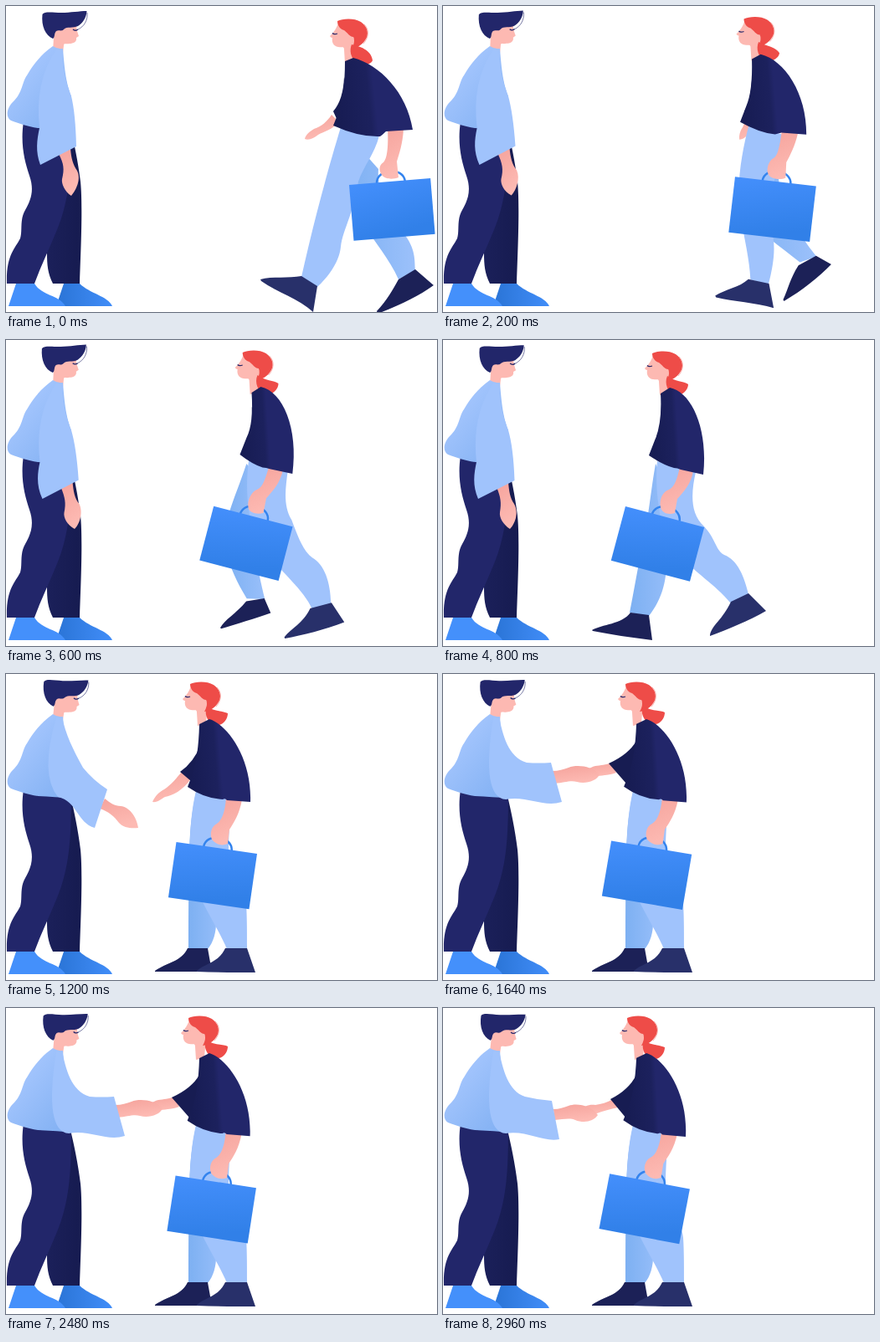
Write an HTML page that moves like this. It is 515 px wide and 366 px high and loops after 3.88 s.

```html
<!DOCTYPE html>
<html lang="en">
<head>
<meta charset="utf-8">
<title>Handshake</title>
<style>
  html, body { margin: 0; width: 100%; height: 100%; overflow: hidden; background: #fff; }
  svg { display: block; width: 515px; height: 366px; }
</style>
</head>
<body>
<svg viewBox="0 0 515 366">
  <defs>
    <linearGradient id="navy" y1=".1" y2="0"><stop offset="0" stop-color="#171c53"/><stop offset=".4" stop-color="#1c215d"/><stop offset=".48" stop-color="#22266a"/></linearGradient>
    <linearGradient id="navyFar"><stop offset="0" stop-color="#1b205a"/><stop offset="1" stop-color="#161b50"/></linearGradient>
    <linearGradient id="pale" x1=".2" y1=".45" x2=".7" y2="1"><stop offset="0" stop-color="#a0c3fc"/><stop offset="1" stop-color="#86b3f4"/></linearGradient>
    <linearGradient id="paleFar"><stop offset="0" stop-color="#7db0f2"/><stop offset="1" stop-color="#9cc1fb"/></linearGradient>
    <linearGradient id="bag" x2=".3" y2="1"><stop offset="0" stop-color="#448ffc"/><stop offset="1" stop-color="#3180e8"/></linearGradient>
    <linearGradient id="shoeFar"><stop offset="0" stop-color="#2a74d6"/><stop offset="1" stop-color="#418df8"/></linearGradient>
    <linearGradient id="skin" x2=".3" y2="1"><stop offset="0" stop-color="#f5a39c"/><stop offset="1" stop-color="#fdbab3"/></linearGradient>
  </defs>

  <g id="woman">
    <path id="reach" fill="url(#skin)"/>
    <path id="farSleeve" fill="#171c52"/>
    <path id="farLeg" fill="url(#paleFar)"/>
    <path id="farShoe" fill="#1c2157"/>
    <path id="nearLeg" fill="#a0c3fc"/>
    <path id="nearShoe" fill="#28306a"/>
    <g id="head">
      <path fill="#fdb9b2" d="M397 20C395 27 392 31 387 36Q388 38 390 38C389 43 391 48 397 49C401 50 404 48 404 52L405 68L415 65L417 42L410 25Z"/>
      <path fill="#ee4c48" d="M396 18C402 15 416 14 424 19C433 25 434 35 429 41C426 46 420 50 413 51C416 46 417 41 415 37C411 37 408 32 404 29C400 28 396 24 396 18Z"/>
      <path fill="none" stroke="#22266a" stroke-width="1.3" d="M390 32.500Q392 34.500 396 33"/>
      <path fill="none" stroke="#f58a84" stroke-width=".7" d="M428 22C434 28 434 37 427 45"/>
    </g>
    <path id="pony" fill="#ee4c48"/>
    <g id="swing">
      <g id="handle"><path fill="none" stroke="#3484ee" stroke-width="2.500" d="M33 1C34 -17 66 -17 67 1"/></g>
      <path id="carry" fill="url(#skin)"/>
      <g id="case"><path fill="url(#bag)" d="M0 0H97.500V67H0Z"/></g>
    </g>
    <g id="lean"><path id="torso" fill="url(#navy)"/></g>
  </g>

  <g id="man">
    <path fill="url(#navyFar)" d="M58 145L78 150C81 163 86 185 89 210C92 240 89 300 88 332L56 332C50 320 49 310 49 295Z"/>
    <path fill="url(#shoeFar)" d="M69 332L88 332C100 344 122 347 127 359L60 359Z"/>
    <path fill="#22266a" d="M21 138C17 165 22 185 28 203C34 220 30 232 23 244C16 256 20 268 17 278C11 290 0 298 1 332L34 332C42 310 52 290 60 270C75 235 78 200 78 148Z"/>
    <path fill="#4490fb" d="M12 332L34 332C43 347 63 345 71 359L3 359Z"/>
    <g id="manHead">
      <path fill="#fdb9b2" d="M58 26L84 22C84 28 86 33 87 36L84 38C85 43 80 45 76 45C72 46 69 44 69 47L68 56L56 54L57 38Z"/>
      <path fill="#22266a" d="M43.500 10C46 6 56 8 66 8C77 8 88 6 96.500 6C96 14 92 20 86 24C80 27 73 24 69 28C66 31 63 28 60 30C57 33 59 37 56 39C47 35 42 24 43.500 10Z"/>
      <path fill="none" stroke="#22266a" stroke-width="1.300" d="M80 28Q83 30.500 86 28"/>
      <path fill="none" stroke="#22266a" stroke-width=".6" d="M97 8C98 17 93 25 86 28"/>
    </g>
    <path fill="url(#pale)" d="M56 48Q62 52 68 51C70 78 72 92 78 108L79 149C66 147 52 147 38 146C25 144 17 141 6 137C-1 133 1 122 8 115C20 104 19 91 25 83C34 68 42 58 56 48Z"/>
    <path id="manHand" fill="url(#skin)"/>
    <path id="sleeve" fill="#a0c3fc"/>
  </g>
</svg>
<script>
const LOOP = 3880, STOP = 2960, STEP = 40, BEAT = 560;
const walk = [0, 400, 800, 1120];
const lift = [0, 400, 800, 1200, 1440];
const greet = [0, 400, 800, 960, 1200, 1440];
const NUM = /-?\d+(?:\.\d+)?/g;
const $ = id => document.getElementById(id);
const numbers = s => s.match(NUM).map(Number);

const parts = [];
function part(id, attr, times, poses, shaken) {
  parts.push({ el: $(id), attr, times, form: poses[0], poses: poses.map(numbers), shaken: shaken && numbers(shaken) });
}

part('farLeg', 'd', walk, [
  'M405 150C408 190 415 230 430 265C440 282 458 302 469 327L489 316C488 305 490 290 475 272C455 255 443 220 445 195C446 180 446 165 446 155Z',
  'M328 148C318 170 305 185 298 202C285 235 325 262 378 294L398 290C375 268 355 245 350 225C352 200 355 180 355 155Z',
  'M254 148C250 170 248 190 244 215C236 255 230 290 223 326L246 330C258 315 264 298 266 282C272 255 278 230 283 210C286 190 290 175 290 158Z',
  'M227 142C222 165 219 190 219 222C218 260 218 295 218 329L241 329C249 320 252 305 251 290C254 265 258 240 260 215C262 190 264 170 264 152Z']);
part('nearLeg', 'd', walk, [
  'M400 145C394 165 386 192 380 215C369 255 362 285 353 324L372 336C383 326 398 308 400 288C402 268 415 250 421 210C428 190 440 178 446 155Z',
  'M330 142C325 165 321 195 326 225C335 260 368 295 376 329L399 329C401 300 396 280 387 267C380 255 370 235 370 208C372 190 376 175 376 155Z',
  'M256 145C254 165 255 190 262 222C275 265 320 285 343 314L365 304C360 283 352 263 336 257C326 252 326 238 312 223C294 207 297 180 302 158Z',
  'M227 140C221 165 219 195 220 222C222 262 250 295 264 329L288 329C288 310 288 290 287 275C285 255 270 235 266 210C266 190 268 175 268 150Z']);
part('farShoe', 'd', walk, [
  'M443 365C455 352 462 340 469 327L489 315L511 334C495 346 470 358 444 368Z',
  'M362 343C363 330 362 318 375 300L397 289L411 294C398 310 380 330 363 344Z',
  'M178 347C190 340 214 340 224 326L246 329L250 359C225 356 200 352 179 348Z',
  'M178 355C192 345 210 344 217 328L241 328L246 356C220 356 200 356 178 356Z']);
part('nearShoe', 'd', walk, [
  'M304 327C318 323 338 326 353 323L372 335L367 366C350 350 325 343 305 329Z',
  'M338 358C350 348 364 343 372 329L400 328L412 355C388 357 360 360 339 360Z',
  'M319 353C321 341 334 335 344 313L365 303L386 324C365 336 340 346 319 354Z',
  'M228 355C240 345 254 345 262 328L288 328L298 357C275 357 250 357 228 356Z']);
part('torso', 'd', walk, [
  'M405 66L415 62C446 70 479 103 486 148L454 150Q450 154 447 156Q422 157 391 143L397 128Q405 105 405 66Z',
  'M333 62L344 55C370 61 392 105 386 158L358 153Q354 152 350 152Q335 148 319 136L327 115Q335 100 333 62Z',
  'M260 64L271 57C297 62 317 106 311 161L284 155Q280 153 276 153Q262 149 246 138L253 120Q262 100 260 64Z',
  'M231 60L243 54C264 60 294 100 292 153L264 151Q262 148 259 150Q237 149 217 135L222 122Q230 100 231 60Z']);
part('farSleeve', 'd', lift, [
  'M404 85Q403 112 391 126L397 139L415 130Z',
  'M334 80Q334 112 328 126L333 139L345 130Z',
  'M261 80Q261 112 255 127L263 139L275 130Z',
  'M232 85Q225 105 208 117L221 128L240 120Z',
  'M231 80Q222 96 198 107L219 131L240 120Z'],
  'M231 80Q222 98 200 109L219 132L240 120Z');
part('reach', 'd', lift, [
  'M389 130C384 138 377 144 368 147C363 150 358 154 357 159C362 161 368 158 373 154C380 150 391 148 397 138Z',
  'M336 125C338 135 340 142 343 147C345 150 347 155 350 160C354 158 357 154 358 148C358 140 356 130 352 125Z',
  'M272 125C274 135 277 142 281 147C283 150 285 153 288 157C291 154 293 151 293 147C293 140 292 130 288 125Z',
  'M211 116C204 124 197 133 189 138C183 141 178 146 175 153C181 154 186 149 190 147C198 146 212 139 221 125Z',
  'M201 106C195 109 188 109 182 110C175 112 168 116 163 122C170 126 178 124 185 122C192 121 200 121 207 118Z'],
  'M203 109C196 113 189 115 182 116C174 115 168 118 165 122C171 126 178 128 184 126C191 123 200 121 209 119Z');
part('carry', 'd', walk, [
  'M456 147L475 147C474 165 470 176 467 186L469 205C462 208 452 207 449 202C445 196 446 190 451 187C456 182 457 165 456 147Z',
  'M357 152L376 156C371 170 364 180 358 188L355 206C350 209 338 207 335 202C332 195 337 181 345 178C350 175 353 165 357 152Z',
  'M283 152L299 156C297 172 287 182 280 190L277 207C270 209 262 208 260 200C258 190 263 181 270 179C277 176 280 165 283 152Z',
  'M263 147L282 150C279 168 272 178 267 186L265 203C258 206 251 204 246 198C243 190 246 182 252 179C258 175 262 165 263 147Z']);
const bagPoses = [
  'translate(410 214) rotate(-4.7)', 'translate(294 198.5) rotate(13.8)',
  'translate(218 199) rotate(14.9)', 'translate(203.5 201) rotate(8.2)'];
part('case', 'transform', walk, bagPoses);
part('handle', 'transform', walk, bagPoses);
part('head', 'transform', lift, [
  'translate(0 0)', 'translate(-73 -4)', 'translate(-146 -2)', 'translate(-176 -6)', 'translate(-178 -6)'],
  'translate(-176 -6)');
part('pony', 'd', lift, [
  'M413 46C422 48 436 52 438 65C436 71 424 71 418 67C412 62 410 53 413 46Z',
  'M341 41C350 48 361 47 366 51C366 59 357 66 349 64C342 61 337 50 341 41Z',
  'M268 43C277 50 288 49 293 53C293 61 284 68 276 66C269 63 264 52 268 43Z',
  'M240 39C249 45 260 44 265 47C265 56 257 63 249 61C242 59 236 49 240 39Z',
  'M239 38C249 45 260 43 265 46C265 55 257 62 249 60C242 58 235 49 239 38Z'],
  'M240 39C249 45 260 44 265 47C265 56 257 63 249 61C242 59 236 49 240 39Z');

const handDown = 'M63 177L77 171C78 182 80 190 85 197C90 207 84 220 78 227C70 222 66 212 67 207C70 195 69 188 63 177Z';
const handReady = 'M64 176L78 170C79 181 80 189 85 196C91 207 86 220 80 226C72 221 67 212 68 206C70 195 69 188 64 176Z';
part('manHand', 'd', greet, [
  handDown,
  'M67 176L81 169C82 180 84 190 90 196C94 206 90 220 84 226C74 222 70 212 71 207C74 195 72 188 67 176Z',
  handReady, handReady,
  'M112 161L118 149C124 154 130 158 137 158C147 159 156 170 158 184C150 185 140 184 135 178C130 171 122 164 112 161Z',
  'M134 131L131 116C138 116 144 114 150 112C160 108 178 110 187 120C184 128 170 132 160 129C152 127 145 130 134 131Z'],
  'M133 134L132 121C139 121 144 119 150 117C160 113 178 117 185 128C180 136 168 138 158 134C152 131 144 133 133 134Z');
const sleeveReady = 'M67 51C68 78 72 92 78 108Q84 128 85.500 168L42 190C35 174 37 160 40 146Q34 90 60 52Z';
part('sleeve', 'd', greet, [
  'M67 51C68 78 72 92 78 108Q83 128 84 168L41 190C35 174 37 160 40 146Q34 90 60 52Z',
  'M67 51C68 78 72 92 78 108Q84 128 88 167L45 190C37 174 38 160 41 146Q34 90 60 52Z',
  sleeveReady, sleeveReady,
  'M67 51C71 72 80 90 92 112Q104 127 121 138L106 184C85 178 85 152 62 147Q40 120 60 52Z',
  'M67 51C71 72 78 100 100 106Q114 107 129 106L142 153C120 160 100 145 75 150Q45 148 60 52Z'],
  'M67 51C71 72 78 100 98 106Q114 110 130 111L139 157C120 161 100 146 75 150Q45 148 60 52Z');
part('manHead', 'transform', lift, [
  'rotate(0 62 50)', 'rotate(-1.5 62 50)', 'rotate(0.3 62 50)', 'rotate(2.5 62 50)', 'rotate(1.6 62 50)'],
  'rotate(2.8 62 50)');

// Monotone cubic through v at times ts; comes to rest at the last key.
function curve(ts, v, t) {
  const last = ts.length - 1;
  if (t >= ts[last]) return v[last];
  const i = ts.findIndex(x => x > t) - 1;
  const slope = k => (v[k + 1] - v[k]) / (ts[k + 1] - ts[k]);
  const tangent = k => {
    if (k === last) return 0;
    if (k === 0) return slope(0);
    const a = slope(k - 1), b = slope(k);
    return a * b <= 0 ? 0 : 2 * a * b / (a + b);
  };
  const h = ts[i + 1] - ts[i], u = (t - ts[i]) / h, w = 1 - u;
  return w * w * ((1 + 2 * u) * v[i] + u * h * tangent(i))
       + u * u * ((3 - 2 * u) * v[i + 1] - w * h * tangent(i + 1));
}

const wave = (t, start) => 2 * Math.PI * (t - start) / BEAT;
function ramp(t, a, b) {
  const u = Math.min(1, Math.max(0, (t - a) / (b - a)));
  return u * u * (3 - 2 * u);
}

function draw(now) {
  const t = Math.min(STOP, Math.floor((now % LOOP) / STEP) * STEP);
  const shake = Math.sin(wave(t, 1640)) / 0.78 * ramp(t, 1440, 1640);
  for (const { el, attr, times, form, poses, shaken } of parts) {
    let i = 0;
    el.setAttribute(attr, form.replace(NUM, () => {
      const v = poses.map(p => p[i]);
      let x = curve(times, v, t);
      if (shaken) x += (shaken[i] - v[v.length - 1]) * shake;
      i++;
      return x.toFixed(2);
    }));
  }
  const turn = -2.5 * (Math.cos(wave(t, 1484)) - 0.4) * ramp(t, 1200, 1484);
  $('swing').setAttribute('transform', `rotate(${turn} 262 105)`);
  $('lean').setAttribute('transform', `rotate(${turn * 0.5} 245 65)`);
}

let begin;
function tick(now) {
  begin ??= now;
  draw(now - begin);
  requestAnimationFrame(tick);
}
draw(0);
requestAnimationFrame(tick);
</script>
</body>
</html>
```
